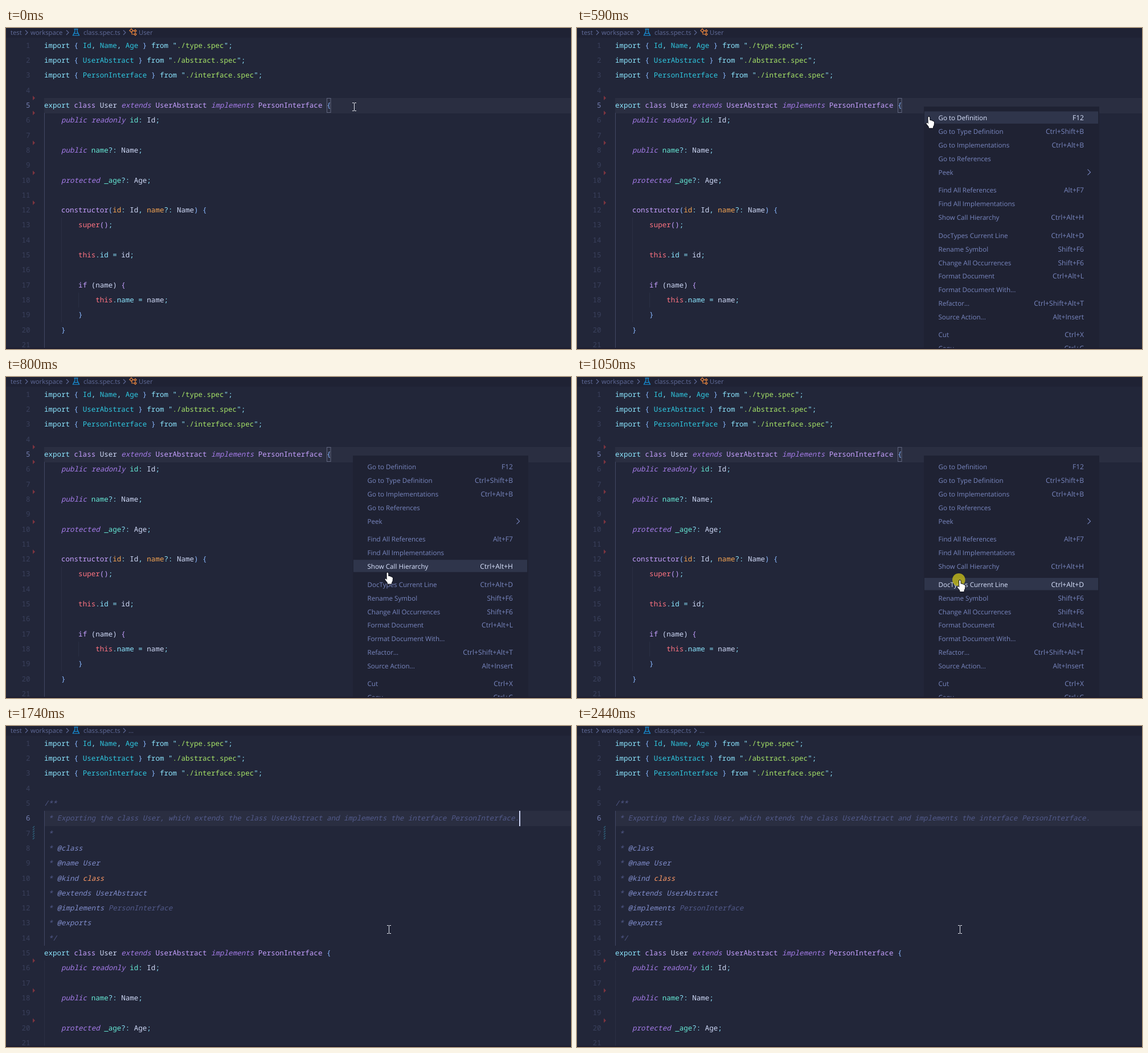
An HTML page with a canvas for the animation above (2.49 s loop, 992 px wide and 564 px high).

```html
<!DOCTYPE html>
<html lang="en">
<head>
<meta charset="utf-8">
<title>Editor</title>
<style>
html, body { margin: 0; width: 100%; height: 100%; overflow: hidden; background: #222639; }
canvas { display: block; }
</style>
</head>
<body>
<canvas id="stage" width="992" height="564"></canvas>
<script>
const ctx = document.getElementById('stage').getContext('2d');
const LOOP = 2490, LEFT = 67, CHAR = 7.515, TOP = 17.4, LINE = 26.3;
const MONO = '12.52px "Noto Sans Mono", "DejaVu Sans Mono", monospace';
const UI = '"Open Sans", "Noto Sans", sans-serif';

const T = { menu: 195, move: 560, hover: 680, rest: 900, press: 1000, close: 1130,
  insert: 1200, crumb: 1340, caretOff: 1480, mark: 1570, paste: 1740 };

// One letter per token style; uppercase letters are italic.
const COLORS = {
  c: '#8ce6ff', b: '#89b8ff', t: '#2fc8e0', g: '#a8e668', p: '#c6a0ff', w: '#d0daf8',
  e: '#66ead6', o: '#f5a553', r: '#ff7482', P: '#a67cea', D: '#525a8a', M: '#808dcc', K: '#ff9a66'
};

const imports = [
  'c|import |b|{ |t|Id|c|, |t|Name|c|, |t|Age |b|} |c|from "|g|./type.spec|c|";',
  'c|import |b|{ |t|UserAbstract |b|} |c|from "|g|./abstract.spec|c|";',
  'c|import |b|{ |t|PersonInterface |b|} |c|from "|g|./interface.spec|c|";',
  ''
];
const body = [
  'c|export |p|class |w|User |P|extends |p|UserAbstract |P|implements |p|PersonInterface |b|{',
  'P|    public readonly |e|id|c|: |w|Id|c|;',
  '',
  'P|    public |e|name|c|?: |w|Name|c|;',
  '',
  'P|    protected |e|_age|c|?: |w|Age|c|;',
  '',
  'p|    constructor|b|(|o|id|c|: |w|Id|c|, |o|name|c|?: |w|Name|b|) {',
  'r|        super|p|()|c|;',
  '',
  'r|        this|c|.id = |w|id|c|;',
  '',
  'p|        if |w|(name) |p|{',
  'r|            this|c|.name = |w|name|c|;',
  'b|        }',
  'b|    }',
  ''
];
const docBlock = text => [
  'D|/**', 'D| * ' + text, 'D| *',
  'D| * |M|@class', 'D| * |M|@name User', 'D| * |M|@kind |K|class',
  'D| * |M|@extends UserAbstract', 'D| * |M|@implements |D|PersonInterface',
  'D| * |M|@exports', 'D| */'
];
const before = [...imports, ...body];
const selected = [...imports, ...docBlock('Description'), ...body].slice(0, 21);
const pasted = [...imports,
  ...docBlock('Exporting the class User, which extends the class UserAbstract and implements the interface PersonInterface.'),
  ...body].slice(0, 21);

const menuGroups = [
  [158, ['Go to Definition|F12', 'Go to Type Definition|Ctrl+Shift+B', 'Go to Implementations|Ctrl+Alt+B',
    'Go to References', 'Peek']],
  [285, ['Find All References|Alt+F7', 'Find All Implementations', 'Show Call Hierarchy|Ctrl+Alt+H']],
  [364.5, ['DocTypes Current Line|Ctrl+Alt+D', 'Rename Symbol|Shift+F6', 'Change All Occurrences|Shift+F6',
    'Format Document|Ctrl+Alt+L', 'Format Document With...', 'Refactor...|Ctrl+Shift+Alt+T',
    'Source Action...|Alt+Insert']],
  [539, ['Cut|Ctrl+X', 'Copy|Ctrl+C']]
];
const menuItems = menuGroups.flatMap(([y, rows]) => rows.map((row, i) => {
  const [label, keys = ''] = row.split('|');
  return { label, keys, y: y + i * 23.85 };
}));

const lineTop = n => TOP + (n - 1) * LINE;
const column = n => LEFT + n * CHAR;
const clamp = v => Math.max(0, Math.min(1, v));

function rect(x, y, w, h, color) {
  ctx.fillStyle = color;
  ctx.fillRect(x, y, w, h);
}
function text(str, x, y, color, font, align = 'left') {
  ctx.font = font;
  ctx.textAlign = align;
  ctx.fillStyle = color;
  ctx.fillText(str, x, y);
}
function path(points, close) {
  ctx.beginPath();
  points.forEach(([x, y]) => ctx.lineTo(x, y));
  if (close) ctx.closePath();
}
function stroke(color, width = 1) {
  ctx.strokeStyle = color;
  ctx.lineWidth = width;
  ctx.stroke();
}
function chevron(x, y, size, color) {
  path([[x, y - size], [x + size, y], [x, y + size]]);
  stroke(color, 1.1);
}

function codeLine(source, n) {
  const parts = source.split('|');
  const y = Math.round(lineTop(n) + 17.4);
  let col = 0;
  for (let i = 0; i + 1 < parts.length; i += 2) {
    const style = parts[i], italic = style < 'a' ? 'italic ' : '';
    for (const word of parts[i + 1].matchAll(/\S+/g))
      text(word[0], column(col + word.index), y, COLORS[style], italic + '500 ' + MONO);
    col += parts[i + 1].length;
  }
}

function breadcrumbs(t) {
  const font = '11.3px ' + UI, color = '#606b99';
  const blue = '#1695df', orange = '#e0803d';
  rect(0, 0, 992, 17, '#1f2234');
  text('test', 8, 12, color, font);
  text('workspace', 43, 12, color, font);
  text('class.spec.ts', 136, 12, color, font);
  [34, 106, 206].forEach(x => chevron(x, 8, 4, color));
  path([[121, 2], [121, 6], [117.5, 13], [128.5, 13], [125, 6], [125, 2]]);
  stroke(blue, 1.2);
  path([[119.5, 2], [126.5, 2]]);
  stroke(blue, 1.2);
  path([[119.5, 9.5], [126.5, 9.5]]);
  stroke(blue, 1.2);
  if (t >= T.crumb) return text('...', 215, 12, color, font);
  path([[221, 6], [221, 11], [226, 11]]);
  stroke(orange, 1.2);
  path([[222, 5], [226, 5]]);
  stroke(orange, 1.2);
  [[220, 4.5, 3], [227, 5, 2], [227, 11, 2]].forEach(([x, y, r]) => {
    path([[x - r, y], [x, y - r], [x + r, y], [x, y + r]], true);
    stroke(orange, 1.3);
  });
  text('User', 233, 12, color, font);
}

function guide(col, from, to, color) {
  rect(Math.round(column(col)), Math.round(from), 1, Math.round(to) - Math.round(from), color);
}

function gutter(t) {
  const inserted = t >= T.insert;
  const marks = !inserted ? [5, 6, 8, 10, 12] : t < T.mark ? [5, 16, 18, 20] : [16, 18, 20];
  marks.forEach(n => {
    const y = lineTop(n) + 0.3;
    path([[47, y - 4], [51, y], [47, y + 4]], true);
    ctx.fillStyle = '#7c343f';
    ctx.fill();
  });
  if (t < T.paste) return;
  for (let y = 179; y < 203; y += 4) {
    path([[47, y], [50, y - 3]]);
    stroke('#2f607a', 1.4);
  }
}

function editor(t) {
  const inserted = t >= T.insert, done = t >= T.paste;
  const active = inserted ? 6 : 5;
  rect(0, 0, 992, 564, '#222639');
  if (!inserted || done) rect(LEFT, Math.round(lineTop(active)), 925, 27, '#2a2e41');

  const dim = '#2a2f44', bright = '#414764';
  if (inserted) {
    guide(0, lineTop(6), lineTop(done ? 15 : 16), bright);
    guide(0, lineTop(16), 564, dim);
  } else {
    guide(0, lineTop(6), 564, bright);
    guide(4, lineTop(13), lineTop(20), dim);
    guide(8, lineTop(18), lineTop(19), dim);
    ctx.strokeStyle = '#616680';
    ctx.lineWidth = 1;
    ctx.strokeRect(563.5, 123.5, 6.5, 25);
  }

  if (inserted && !done) rect(column(3), 149, 11 * CHAR, 27, '#474a5f');
  const lines = done ? pasted : inserted ? selected : before;
  lines.forEach((source, i) => {
    const n = i + 1;
    text(n, 42.5, Math.round(lineTop(n) + 17.4), n === active ? '#7681b5' : '#3a405c', MONO, 'right');
    codeLine(source, n);
  });
  gutter(t);

  const caret = '#ccd4f4';
  if (inserted && t < T.caretOff) rect(171, 149, 2, 27, caret);
  if (done && (t < 1940 || (t >= 2190 && t < 2440))) rect(901, 149, 2, 27, caret);
  rect(0, 562, 992, 2, '#1c1b2d');
  breadcrumbs(t);
}

function pointer(t) {
  const a = clamp((t - T.move) / (T.hover - T.move));
  const b = clamp((t - T.hover) / (T.rest - T.hover));
  const first = a * a * (2 - a);
  const second = 1 - (1 - b) ** 2;
  return [610 + 48 * first + 12 * second, 138 + 152 * first + 67 * second];
}

function menu(t, y) {
  ctx.save();
  ctx.globalAlpha = clamp((t - T.menu) / 83);
  rect(609, 138, 308, 426, '#1f2233');
  for (const item of menuItems) {
    const hot = t >= T.move && Math.abs(y - item.y) < 11.9;
    const color = hot ? '#dbe4ff' : '#7987c0';
    if (hot) rect(610, item.y - 11.5, 305, 21.5, '#2f354b');
    const baseline = Math.round(item.y + 4.4);
    text(item.label, 634.5, baseline, color, '11.6px ' + UI);
    text(item.keys, 890, baseline, color, '12.1px ' + UI, 'right');
    if (item.label === 'Peek') chevron(896.5, item.y, 5, color);
  }
  rect(609, 562, 308, 2, '#1c1b2d');
  ctx.restore();
}

function outlined(points) {
  ctx.lineJoin = 'round';
  path(points, true);
  stroke('#10121c', 2);
  ctx.fillStyle = '#fff';
  ctx.fill();
  ctx.lineJoin = 'miter';
}
function beam(x, y) {
  const color = '#e4e6ee';
  rect(x, y - 6, 1, 13, color);
  for (const dy of [-7, 7]) {
    rect(x - 3, y + dy, 3, 1, color);
    rect(x + 1, y + dy, 3, 1, color);
  }
}
function arrow(x, y) {
  outlined([[0, 0], [0, 15], [3.4, 12], [5.6, 17], [8, 16], [5.8, 11], [10.5, 10.7]]
    .map(([dx, dy]) => [x + dx, y + dy]));
}
function hand(x, y) {
  outlined([[0, 1], [1.2, 0], [2.5, 1], [2.7, 6.5], [5, 6.6], [7.2, 7.5], [9.6, 8.6], [10.5, 10],
    [10, 15], [8.6, 17.5], [8.4, 20], [1.5, 20], [1, 17.5], [-3, 12.5], [-2.8, 11], [-1.2, 11.2], [0.2, 13]]
    .map(([dx, dy]) => [x + dx, y + dy]));
}

function draw(t) {
  editor(t);
  if (t < T.menu) return beam(611, 138);
  if (t >= T.close) return beam(672, 357);
  const [x, y] = pointer(t);
  menu(t, y);
  if (t >= T.press) {
    ctx.beginPath();
    ctx.arc(x + 0.3, y - 0.7, 11.3, 0, Math.PI * 2);
    ctx.fillStyle = 'rgba(188,180,28,.84)';
    ctx.fill();
  }
  if (y < 147) arrow(x, y + 1);
  else hand(x + 1, y);
}

ctx.textBaseline = 'alphabetic';
ctx.textRendering = 'geometricPrecision';
const start = performance.now();
function frame() {
  draw((performance.now() - start) % LOOP);
  requestAnimationFrame(frame);
}
frame();
</script>
</body>
</html>
```
